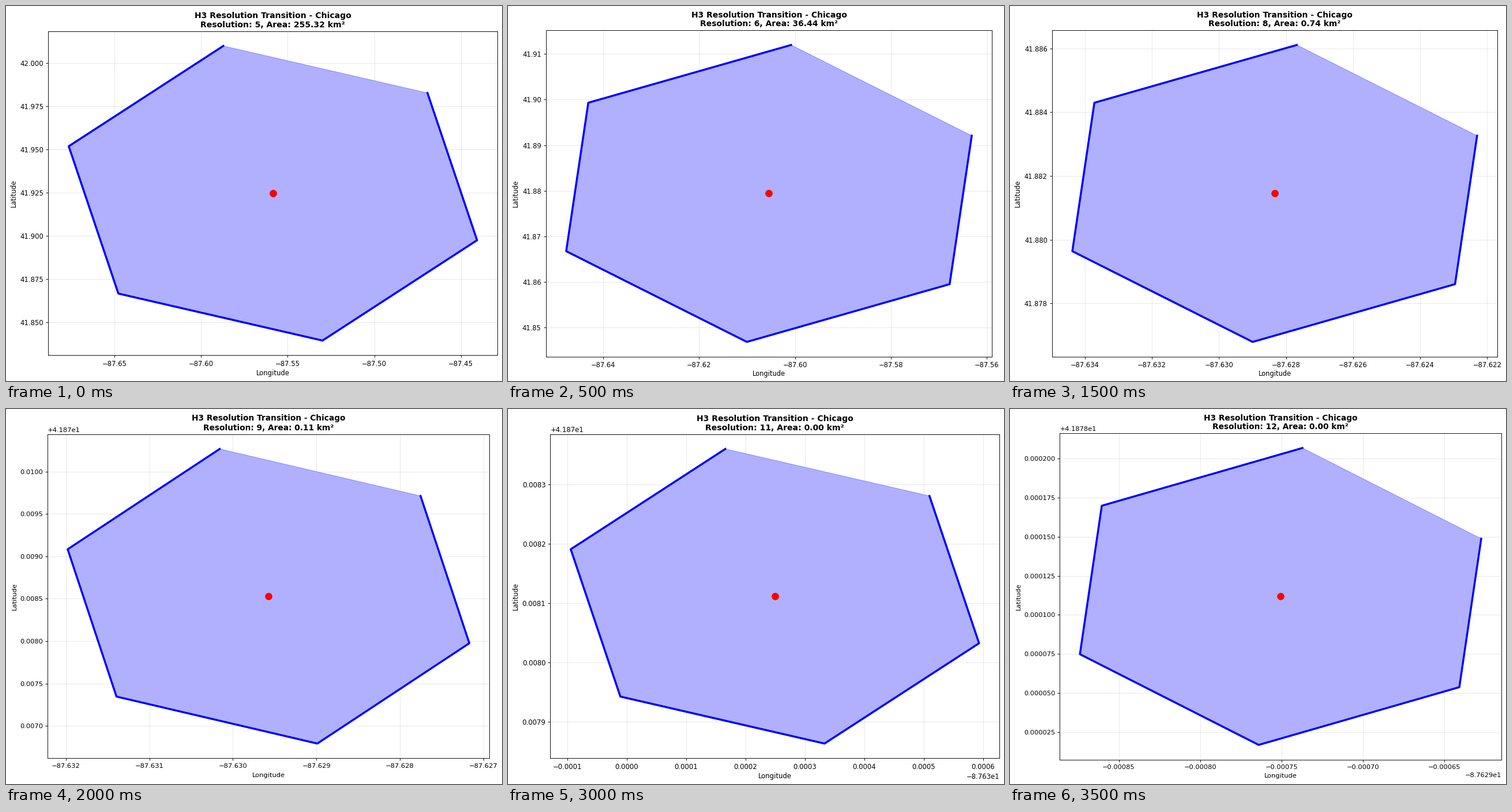
These frames come from a looping animation (860 by 651 pixels, 4 s). A matplotlib script:

```python
import numpy as np
import matplotlib.pyplot as plt
from matplotlib.animation import FuncAnimation

W, H, DPI = 860, 651, 100
AXES_WIDTH = 930   # axes width in pixels before the plot is fitted to the stage
PAD = 10           # margin around the plot before fitting

FIRST, LAST = 5, 12
LAST_CENTRE = np.array([-87.6297506, 41.8781118])
FIRST_AREA = 255.32

# Moves from each cell's centre to that of the next finer one, as multiples
# of the finer cell's vertices a and c.
DOWN_LEFT, LEFT, UP_RIGHT, STAY = (-1, 1), (1, 2), (1, -1), (0, 0)
MOVES = [DOWN_LEFT, LEFT, UP_RIGHT, DOWN_LEFT, STAY, DOWN_LEFT, STAY]


def half_size(res):
    """Half width and height of a cell; both shrink sevenfold per two steps."""
    base = (0.11793, 0.08515) if res % 2 else (0.04227, 0.03262)
    return np.array(base) / 7 ** ((res - FIRST) // 2)


def corners(res):
    """Two vertices that span the centrally symmetric cell."""
    shape = [(-0.243, 1), (-0.757, -0.681)] if res % 2 else [(0.109, 1), (-1, -0.389)]
    return np.array(shape) * half_size(res)


def centre(res):
    """Walk back from the finest cell."""
    finer = range(res + 1, LAST + 1)
    return LAST_CENTRE - sum((np.array(MOVES[r - FIRST - 1]) @ corners(r)
                              for r in finer), np.zeros(2))


def area(res):
    """A seventh per step, slightly less towards the south and west."""
    dlon, dlat = centre(res) - centre(FIRST)
    return FIRST_AREA / 7 ** (res - FIRST) * (1 + 0.018 * dlat + 0.0037 * dlon)


def set_style(kx, ky):
    plt.rcParams.update({
        "font.family": "DejaVu Sans",
        "font.size": 10 * kx,
        "axes.linewidth": 0.8 * kx,
        "grid.linewidth": 0.8 * kx,
        "axes.titlepad": 6 * ky,
        "xtick.major.size": 3.5 * ky,
        "xtick.major.pad": 3.5 * ky,
        "xtick.major.width": 0.8 * kx,
        "ytick.major.size": 3.5 * kx,
        "ytick.major.pad": 3.5 * kx,
        "ytick.major.width": 0.8 * kx,
    })


fig = plt.figure(figsize=(W / DPI, H / DPI), dpi=DPI, facecolor="white")


def plot(res, box, kx=1, ky=1):
    """Draw one cell with its axes in a pixel box, at the given scale."""
    set_style(kx, ky)
    fig.clear()
    ax = fig.add_axes(np.array(box) / (W, H, W, H))

    mid, half = centre(res), half_size(res)
    a, c = corners(res)
    ring = np.array([a, a + c, c])
    x, y = (np.vstack([ring, -ring]) + mid).T
    ax.fill(x, y, facecolor="#b0b0ff", edgecolor=(0, 0, 1, 0.3), lw=kx)
    ax.plot(x, y, color="blue", lw=3 * kx)
    ax.plot(*mid, "o", color="red", ms=10 * kx, mew=kx)

    ax.set_xlim(mid[0] - 1.1 * half[0], mid[0] + 1.1 * half[0])
    ax.set_ylim(mid[1] - 1.1 * half[1], mid[1] + 1.1 * half[1])
    ax.set_axisbelow(True)
    ax.grid(True, alpha=0.3)
    ax.set_xlabel("Longitude")
    ax.set_ylabel("Latitude")
    ax.set_title(f"H3 Resolution Transition - Chicago\n"
                 f"Resolution: {res}, Area: {area(res):.2f} km²",
                 fontweight="bold", linespacing=1.2 * ky / kx)
    return ax


def draw(i):
    res = FIRST + i
    hx, hy = half_size(res)
    w, h = AXES_WIDTH, AXES_WIDTH * hy / hx

    # Measure the plot with equal axes, then fit it to the stage.
    ax = plot(res, (0, 0, w, h))
    tight = ax.get_tightbbox()
    label_y = ax.xaxis.label.get_position()[1] / h
    label_x = ax.yaxis.label.get_position()[0] / w
    kx = W / int(tight.width + 2 * PAD)
    ky = H / int(tight.height + 2 * PAD)

    box = ((PAD - tight.x0) * kx, (PAD - tight.y0) * ky, w * kx, h * ky)
    ax = plot(res, box, kx, ky)
    ax.xaxis.set_label_coords(0.5, label_y)
    ax.yaxis.set_label_coords(label_x, 0.5)
    return []


anim = FuncAnimation(fig, draw, frames=LAST - FIRST + 1, interval=500,
                     repeat=True, repeat_delay=0, blit=False)
plt.show()
```
